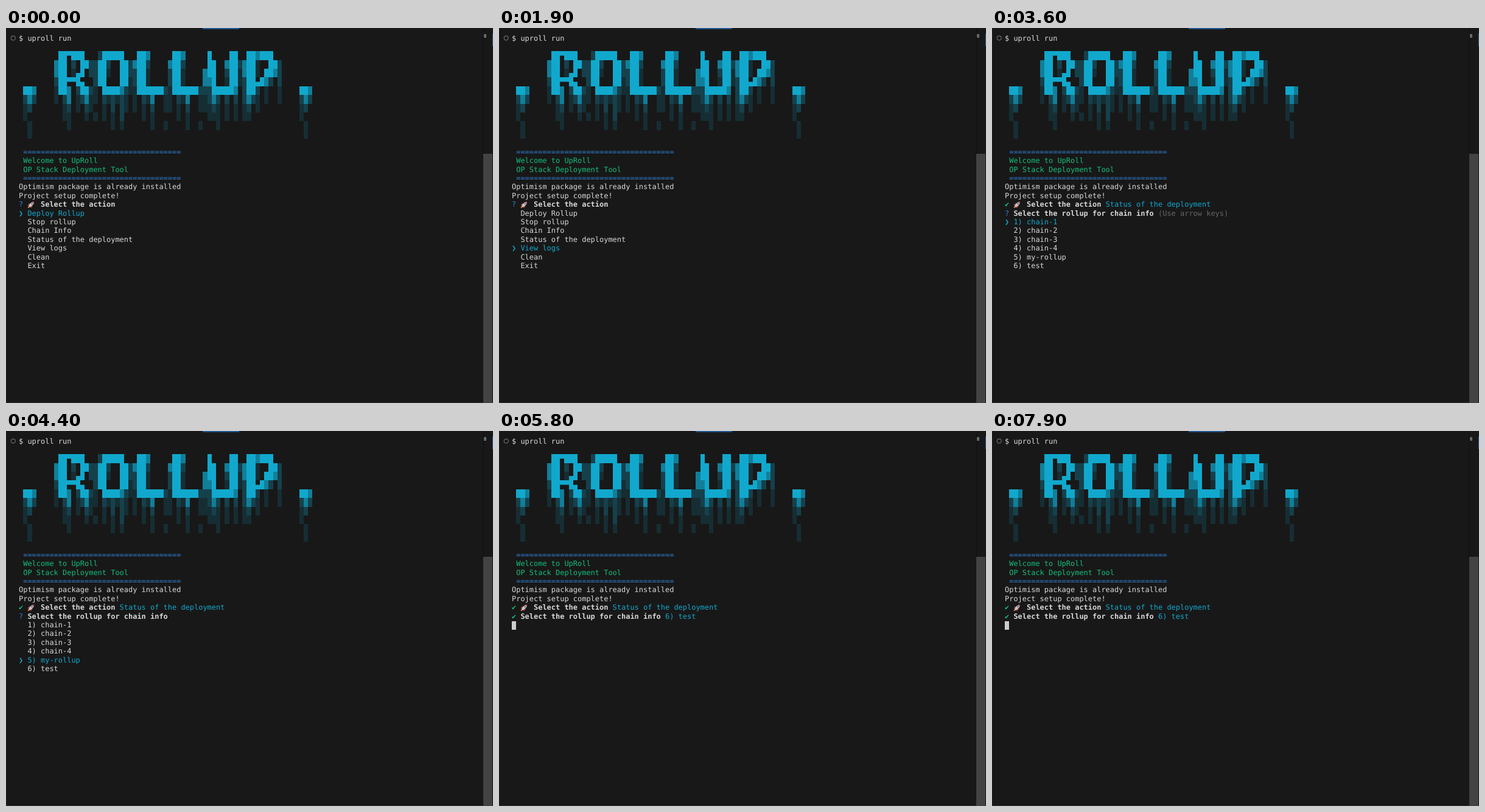
An HTML page with a canvas that plays this animation: 800x617 px, repeating every 8 s.

```html
<!DOCTYPE html>
<html lang="en">
<head>
<meta charset="utf-8">
<title>Terminal session</title>
<style>
  html, body { margin: 0; width: 100%; height: 100%; overflow: hidden; background: #181818; }
  canvas { display: block; }
</style>
</head>
<body>
<canvas id="stage" width="800" height="617"></canvas>
<script>
const ctx = document.getElementById('stage').getContext('2d');
const LOOP = 8000;
const LEFT = 21, TOP = 9.3, CELL_W = 7.2, CELL_H = 14.4;
const WHITE = '#d9d9d9', CYAN = '#11a8cd', BLUE = '#2f80d4', GREEN = '#12bf7c', GREY = '#666666';

const banner = [
  '         ██▀███   ▒█████   ██▓     ██▓     █    ██  ██▓███',
  '        ▓██ ▒ ██▒▒██▒  ██▒▓██▒    ▓██▒     ██  ▓██▒▓██░  ██▒',
  '        ▓██ ░▄█ ▒▒██░  ██▒▒██░    ▒██░    ▓██  ▒██░▓██░ ██▓▒',
  '        ▒██▀▀█▄  ▒██   ██░▒██░    ▒██░    ▓▓█  ░██░▒██▄█▓▒ ▒',
  ' ██▓    ░██▓ ▒██▒░ ████▓▒░░██████▒░██████▒▒▒█████▓ ▒██▒ ░  ░    ██▓',
  ' ▒▓▒    ░ ▒▓ ░▒▓░░ ▒░▒░▒░ ░ ▒░▓  ░░ ▒░▓  ░░▒▓▒ ▒ ▒ ▒▓▒░ ░  ░    ▒▓▒',
  ' ░▒       ░▒ ░ ▒░  ░ ▒ ▒░ ░ ░ ▒  ░░ ░ ▒  ░░░▒░ ░ ░ ░▒ ░         ░▒',
  ' ░        ░░   ░ ░ ░ ░ ▒    ░ ░     ░ ░    ░░░ ░ ░ ░░           ░',
  '  ░        ░         ░ ░      ░  ░    ░  ░   ░                   ░',
  '  ░                                                              ░'
];
// Opacity on even and odd pixels of each shade's checkerboard
const shades = { '░': [0.22, 0.09], '▒': [0.34, 0.24], '▓': [0.76, 0.68] };

const actions = ['Deploy Rollup', 'Stop rollup', 'Chain Info', 'Status of the deployment', 'View logs', 'Clean', 'Exit'];
const chains = ['1) chain-1', '2) chain-2', '3) chain-3', '4) chain-4', '5) my-rollup', '6) test'];
// [time, selected item]
const actionMoves = [[0, 0], [700, 1], [1000, 2], [1300, 3], [1600, 4], [2200, 3]];
const chainMoves = [[3200, 0], [3800, 1], [4000, 2], [4200, 3], [4400, 4], [4800, 5]];
const ACTION_CHOSEN = 2600, CHAIN_ASKED = 3200, CHAIN_CHOSEN = 5300;

const colX = col => LEFT + col * CELL_W;
const rowY = row => TOP + row * CELL_H;

function rect(x, y, w, h, color) {
  ctx.fillStyle = color;
  ctx.fillRect(x, y, w, h);
}

function print(row, col, text, color = WHITE, bold = false) {
  ctx.font = `${bold ? 'bold ' : ''}11.96px "DejaVu Sans Mono", "DejaVu Sans", monospace`;
  ctx.fillStyle = color;
  [...text].forEach((char, i) => {
    if (char !== ' ') ctx.fillText(char, colX(col + i), rowY(row) + 11.3);
  });
}

function drawBlock(char, x, y) {
  const right = Math.round(x + CELL_W), bottom = Math.round(y + CELL_H);
  x = Math.round(x);
  y = Math.round(y);
  const w = right - x, h = bottom - y;
  if (char === '█') rect(x, y, w, h, CYAN);
  if (char === '▀') rect(x, y, w, h / 2, CYAN);
  if (char === '▄') rect(x, y + h / 2, w, h / 2, CYAN);
  if (!shades[char]) return;
  for (let py = y; py < bottom; py++) {
    for (let px = x; px < right; px++) {
      ctx.globalAlpha = shades[char][(px + py) % 2];
      rect(px, py, 1, 1, CYAN);
    }
  }
  ctx.globalAlpha = 1;
}

function drawRocket(x, y) {
  const blob = (cx, cy, rx, ry, color) => {
    ctx.fillStyle = color;
    ctx.beginPath();
    ctx.ellipse(cx, cy, rx, ry, 0, 0, 7);
    ctx.fill();
  };
  ctx.save();
  ctx.translate(x, y);
  ctx.rotate(Math.PI / 4);
  blob(-2.4, 2.2, 1.3, 2.5, '#b33a3a');
  blob(2.4, 2.2, 1.3, 2.5, '#b33a3a');
  blob(0, 5.5, 1.1, 2, '#d98a3a');
  blob(0, -0.6, 2.4, 5.6, '#c3c7cb');
  blob(0, -5, 1.2, 1.6, '#c04a48');
  blob(0, -1.8, 1.1, 1.1, '#3c5364');
  ctx.restore();
}

function drawBackdrop() {
  rect(0, 0, 800, 617, '#181818');
  rect(0, 0, 1, 617, '#202020');
  rect(0, 616, 800, 1, '#2b2b2b');
  rect(323, 0, 60, 2, '#1f568f');
  rect(784, 0, 1, 207, '#0f0f0f');
  rect(784, 207, 15, 410, '#434343');
  rect(785, 10, 4, 6, '#686868');
  rect(799, 9, 1, 21, '#2a63a8');
  ctx.strokeStyle = '#6b6b6b';
  ctx.lineWidth = 1.1;
  ctx.beginPath();
  ctx.arc(11.8, 16.6, 3.5, 0, 7);
  ctx.stroke();

  print(0, 0, '$ uproll run');
  banner.forEach((line, r) => [...line].forEach((char, c) => drawBlock(char, colX(c), rowY(r + 2))));
  print(13, 1, '='.repeat(36), BLUE);
  print(14, 1, 'Welcome to UpRoll', GREEN);
  print(15, 1, 'OP Stack Deployment Tool', GREEN);
  print(16, 1, '='.repeat(36), BLUE);
  print(17, 0, 'Optimism package is already installed');
  print(18, 0, 'Project setup complete!');
}

function drawPrompt(row, col, question, answer) {
  print(row, 0, answer ? '✔' : '?', answer ? GREEN : BLUE);
  print(row, col, question, WHITE, true);
  if (answer) print(row, col + question.length + 1, answer, CYAN);
}

function drawMenu(row, items, moves, t) {
  const selected = moves.filter(([time]) => time <= t).pop()[1];
  items.forEach((item, i) => {
    const active = i === selected;
    if (active) print(row + i, 0, '❯', CYAN);
    print(row + i, 2, item, active ? CYAN : WHITE);
  });
}

const drawCursor = row => rect(LEFT, Math.round(rowY(row)) + 1, 7, 14, '#cccccc');

const backdrop = document.createElement('canvas');

function render(t) {
  ctx.drawImage(backdrop, 0, 0);
  drawPrompt(19, 5, 'Select the action', t >= ACTION_CHOSEN && actions[3]);
  drawRocket(41.3, 290.6);
  if (t < ACTION_CHOSEN) return drawMenu(20, actions, actionMoves, t);
  if (t < CHAIN_ASKED) return drawCursor(20);

  drawPrompt(20, 2, 'Select the rollup for chain info', t >= CHAIN_CHOSEN && chains[5]);
  if (t >= CHAIN_CHOSEN) return drawCursor(21);
  if (t < chainMoves[1][0]) print(20, 35, '(Use arrow keys)', GREY);
  drawMenu(21, chains, chainMoves, t);
}

ctx.textRendering = 'geometricPrecision';
drawBackdrop();
backdrop.width = 800;
backdrop.height = 617;
backdrop.getContext('2d').drawImage(ctx.canvas, 0, 0);

const start = performance.now();
function tick() {
  render((performance.now() - start) % LOOP);
  requestAnimationFrame(tick);
}
tick();
</script>
</body>
</html>
```
